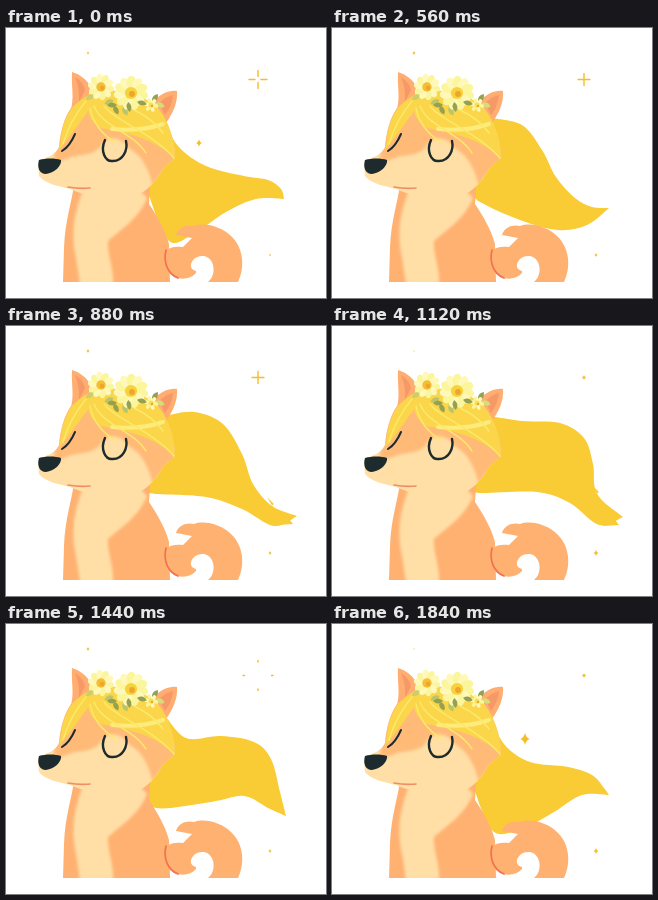
Animation of 320 by 270 pixels, one loop 1920 ms. Source, as an HTML page:

```html
<!DOCTYPE html>
<html lang="en">
<head>
<meta charset="utf-8">
<title>Dog with flowing hair</title>
<style>
  html, body { margin: 0; width: 100%; height: 100%; overflow: hidden; background: #fff; }
  svg { display: block; width: 320px; height: 270px; }
</style>
</head>
<body>
<svg viewBox="0 0 320 270" fill="none" stroke-linecap="round" stroke-linejoin="round">
  <defs>
    <filter id="soft" x="-20%" y="-20%" width="140%" height="140%"><feGaussianBlur stdDeviation="1.6"/></filter>
    <clipPath id="torso"><path d="M68 156C66 174 59 192 58 220L57 254H164L163 216C159 201 151 188 143 176L145 145Z"/></clipPath>
    <clipPath id="head"><path d="M65 80C58 90 54 105 53 119C51 124 46 128 37 131L32 137L33 148C39 156 53 158 64 161C80 168 105 174 126 169C143 164 151 151 157 141L169 130C169 108 160 78 125 67Q90 62 65 80Z"/></clipPath>
  </defs>

  <path id="flow" fill="#f9cb34"/>
  <path id="tuft" fill="#f9cb34"/>

  <!-- curled tail -->
  <path fill="#ffb171" d="M159 223C164 219 170 218 177 219L186 210L170 207C172 199 181 196 188 198C199 194 216 199 225 208C238 220 239 240 232 254H202C211 247 209 230 198 228C190 227 184 233 185 239C187 244 191 241 190 245C185 251 176 252 168 249C158 243 157 232 159 223Z"/>

  <g clip-path="url(#torso)">
    <path fill="#ffb171" d="M50 150H170V256H50Z"/>
    <path fill="#ffdfa6" filter="url(#soft)" d="M78 160C69 181 64 204 70 230L74 256H107C108 240 101 226 102 213C114 202 132 192 141 170L128 156Z"/>
  </g>
  <path stroke="#f2724f" stroke-width="1.7" d="M160 222C157 235 162 246 172 250"/>

  <!-- ears -->
  <path fill="#ffad70" d="M66 44C75 47 81 52 84 58L82 78L64 84C69 71 65 58 66 44Z"/>
  <path fill="#f79867" d="M69 49Q77 54 79 62L73 74Q74 60 69 49Z"/>
  <path fill="#ffad70" d="M148 73C154 66 163 62 171 63C172 74 167 85 160 95Z"/>
  <path fill="#f79867" d="M153 75Q161 68 167 67Q166 78 159 87Z"/>

  <g clip-path="url(#head)">
    <path fill="#ffdfa6" d="M25 60H175V180H25Z"/>
    <path fill="#ffba78" filter="url(#soft)" d="M50 70H175V130C162 138 151 148 147 159C143 141 136 128 124 121C113 106 99 108 94 119C85 129 72 126 63 130L48 136Z"/>
  </g>
  <path fill="#1d2b2e" d="M33 132C40 130 49 130 55 132C56 138 48 145 40 146C33 146 31 139 33 132Z"/>
  <path stroke="#ee8e67" stroke-width="1.6" d="M62 159Q73 161 84 160"/>
  <g stroke="#1d2b2e" stroke-width="2.4">
    <path stroke-width="2" d="M56 123C61 120 66 113 69 106"/>
    <path d="M99 112C94 123 99 134 107 133C117 133 122 122 120 113"/>
  </g>

  <!-- fringe -->
  <path fill="#fbd64a" d="M83 67C73 72 64 80 60 91C55 101 56 111 53 122C61 111 70 101 77 90Q85 82 86 69Z"/>
  <path fill="#fbd64a" d="M82 67C79 82 84 95 95 100C115 104 148 109 169 131C168 113 165 100 157 87C147 69 112 55 82 67Z"/>
  <path stroke="#fdeb7b" stroke-width="4" d="M106 101Q134 104 157 96"/>
  <g stroke="#fbe96a" stroke-width="1.4">
    <path d="M80 73C70 85 62 99 57 116"/>
    <path d="M84 80C87 96 97 107 110 115"/>
    <path d="M88 78C96 99 127 104 140 125"/>
    <path d="M98 78C109 93 145 104 168 130"/>
    <path d="M128 82Q147 91 157 105"/>
  </g>
  <g id="crown"></g>
  <g id="sparkles" fill="#f5bd26" stroke="#f5bd26"></g>
</svg>
<script>
const LOOP = 1920, STEP = 80;
const times = [0, 320, 560, 880, 1120, 1440, 1840];
// Upper edge, tip, then lower edge of the hair, as x,y pairs.
const poses = [
  [172,118, 200,138, 238,148, 262,152, 275,161, 278,171, 250,171, 220,184, 190,204, 163,213],
  [181,110, 194,134, 211,156, 234,168, 257,173, 278,174, 250,192, 226,202, 190,199, 150,183],
  [190,97, 210,122, 224,149, 243,170, 260,179, 277,180, 255,197, 226,202, 188,192, 148,174],
  [188,86, 217,98, 236,128, 247,158, 266,180, 291,190, 268,200, 236,183, 200,171, 150,168],
  [190,95, 228,97, 252,112, 261,138, 265,168, 291,191, 267,199, 238,177, 205,166, 150,167],
  [180,114, 215,112, 248,118, 265,135, 274,168, 280,192, 262,184, 238,172, 205,178, 150,184],
  [172,120, 198,138, 236,143, 260,151, 272,164, 277,171, 250,171, 222,188, 195,202, 162,208]
];
const stars = [
  { x: 82, y: 25, size: [1.7, 1.7, 2, 2, 1, 2, 1] },
  { x: 193, y: 115, size: [3.5, 3.5, 0, 0, 0, 0, 6] },
  { x: 264, y: 227, size: [1.5, 1.7, 2, 2, 3, 2, 3] }
];
const cross = { x: 252, y: 51.5, outer: [9, 9, 6, 6, 1.2, 15, 1.2], inner: [3, 3, 0, 0, 0, 13.5, 0] };

const $ = id => document.getElementById(id);
const count = times.length;
const timeAt = i => times[(i + count) % count] + LOOP * Math.floor(i / count);
const at = (list, i) => list[(i + count) % count];

function segment(t) {
  let i = count - 1;
  while (times[i] > t) i--;
  const span = timeAt(i + 1) - timeAt(i);
  return { i, span, u: (t - timeAt(i)) / span };
}

const linear = (list, { i, u }) => at(list, i) * (1 - u) + at(list, i + 1) * u;

function blendPose({ i, span, u }) {
  const slope = (k, n) => (at(poses, k + 1)[n] - at(poses, k - 1)[n]) / (timeAt(k + 1) - timeAt(k - 1));
  const s = u * u * (3 - 2 * u);
  return poses[i].map((a, n) => {
    const b = at(poses, i + 1)[n];
    return a + (b - a) * s
      + span * u * (1 - u) * ((1 - u) * slope(i, n) - u * slope(i + 1, n));
  });
}

function curve(points) {
  let d = '';
  for (let i = 0; i < points.length - 1; i++) {
    const p = points[Math.max(0, i - 1)], a = points[i], b = points[i + 1];
    const q = points[Math.min(points.length - 1, i + 2)];
    const c1 = a.map((v, k) => v + (b[k] - p[k]) / 6);
    const c2 = b.map((v, k) => v - (q[k] - a[k]) / 6);
    d += `C${[...c1, ...c2, ...b].map(v => v.toFixed(2))}`;
  }
  return d;
}

function drawHair(seg, t) {
  const flat = blendPose(seg), pts = [];
  for (let i = 0; i < flat.length; i += 2) pts.push([flat[i], flat[i + 1]]);
  const upper = [[158, 90], ...pts.slice(0, 6)];
  const lower = [...pts.slice(5), [142, 165]];
  $('flow').setAttribute('d', `M158 90${curve(upper)}${curve(lower)}Z`);
  const [x, y] = pts[4], [tx, ty] = pts[5];
  const ragged = t >= 800 && t <= 1200;
  $('tuft').setAttribute('d', ragged
    ? `M${x - 5} ${y - 9}L${x + 2} ${y - 2}L${x - 1} ${y}L${x + 5} ${y + 8}ZM${tx - 16} ${ty}L${tx - 8} ${ty + 3}L${tx - 4} ${ty + 8}L${tx - 20} ${ty + 9}Z`
    : '');
}

function sparkle(x, y, r) {
  if (r < 0.3) return '';
  const k = r * 0.2;
  return `<path stroke="none" d="M${x} ${y - r}Q${x + k} ${y - k} ${x + r * .8} ${y}Q${x + k} ${y + k} ${x} ${y + r}Q${x - k} ${y + k} ${x - r * .8} ${y}Q${x - k} ${y - k} ${x} ${y - r}Z"/>`;
}

function drawSparkles(seg) {
  const outer = linear(cross.outer, seg), inner = linear(cross.inner, seg);
  const rays = [[0, -1], [1, 0], [0, 1], [-1, 0]].map(([x, y]) =>
    `M${cross.x + x * inner} ${cross.y + y * inner}L${cross.x + x * outer} ${cross.y + y * outer}`).join('');
  $('sparkles').innerHTML = `<path stroke-width="1.4" d="${rays}"/>`
    + stars.map(s => sparkle(s.x, s.y, linear(s.size, seg))).join('');
}

function flower(x, y, r, petals, heart) {
  let out = '';
  for (let i = 0; i < petals; i++) {
    const angle = i * 360 / petals + 10;
    out += `<ellipse cx="${r * .62}" rx="${r * .4}" ry="${r * .27}" fill="${i % 2 ? '#fff8b9' : '#fbf59c'}" transform="translate(${x} ${y}) rotate(${angle})"/>`;
  }
  return out + `<circle cx="${x}" cy="${y}" r="${r * .36}" fill="${heart}"/><circle cx="${x + 1}" cy="${y + 1}" r="${r * .17}" fill="#eda52e"/>`;
}

const leaf = (x, y, angle, color = '#93a150') =>
  `<path fill="${color}" d="M-5 0Q0-5 5 0Q0 5-5 0Z" transform="translate(${x} ${y}) rotate(${angle})"/>`;

$('crown').innerHTML =
  leaf(84, 69, -35, '#c9cf70') + leaf(103, 74, -25, '#b9c568') + leaf(106, 77, 0)
  + leaf(110, 82, 65) + leaf(119, 83, 65, '#b9c568') + leaf(149, 70, -55) + leaf(154, 77, 20, '#d9da78')
  + flower(95, 59, 13, 10, '#f5bd35') + flower(125, 65, 17, 11, '#f8d23c')
  + flower(145, 77, 7, 6, '#f8df58') + leaf(136, 75, 15) + leaf(123, 79, 80);

function render(now) {
  const t = Math.floor(now % LOOP / STEP) * STEP;
  const seg = segment(t);
  drawHair(seg, t);
  drawSparkles(seg);
}

const start = performance.now();
function tick() {
  render(performance.now() - start);
  requestAnimationFrame(tick);
}
tick();
</script>
</body>
</html>
```
